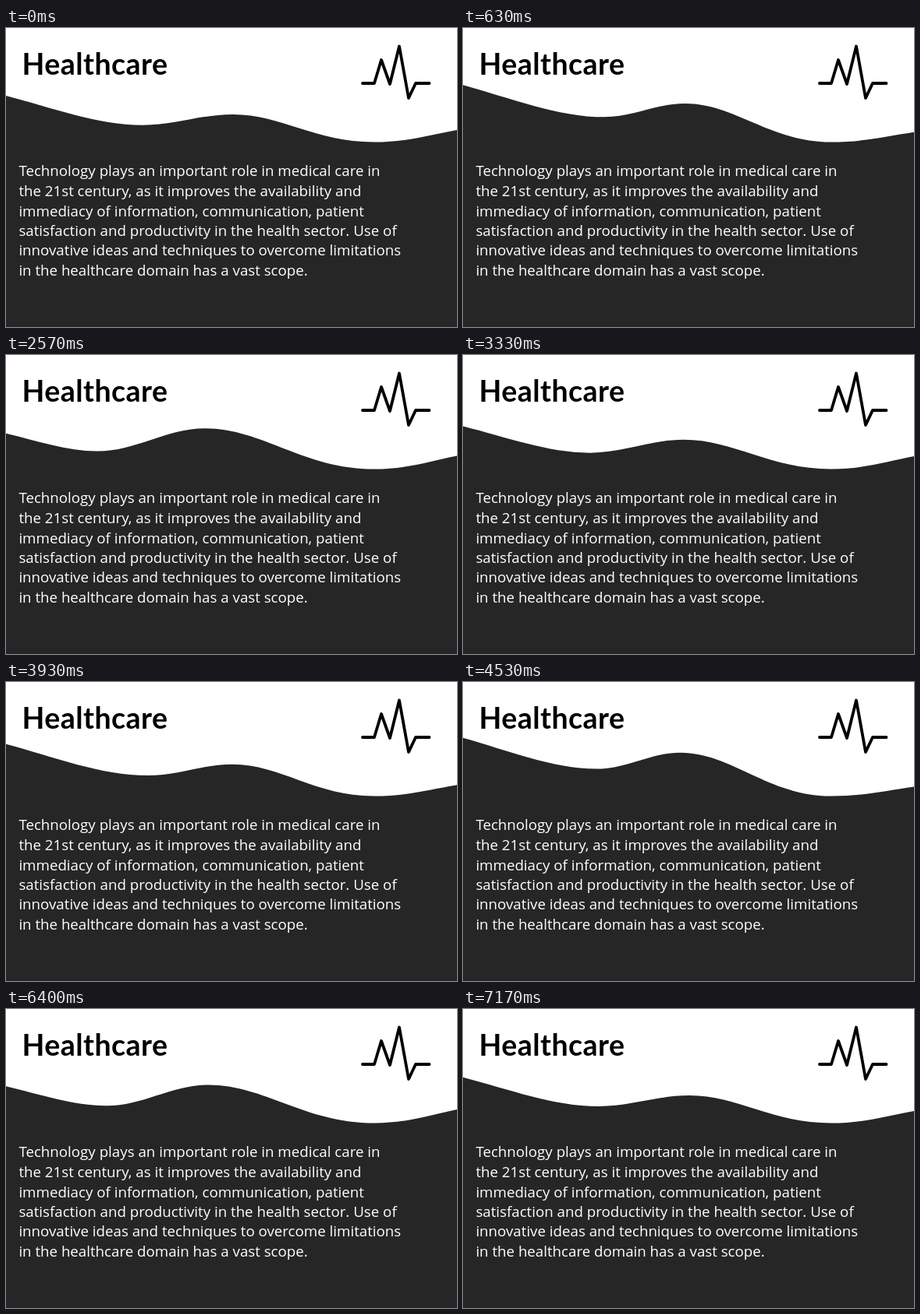
Animation, 578 px wide and 384 px high, one loop 7210 ms. Source, as an HTML page:

```html
<!DOCTYPE html>
<html lang="en">
<head>
<meta charset="utf-8">
<title>Healthcare</title>
<style>
  html, body { margin: 0; width: 100%; height: 100%; overflow: hidden; background: #fff; }
  svg { display: block; width: 578px; height: 384px; }
  .title { font: 700 37.5px Lato, sans-serif; letter-spacing: .45px; }
  .body { font: 18.72px "Open Sans", sans-serif; fill: #fff; }
</style>
</head>
<body>
<svg viewBox="0 0 578 384">
  <path id="wave" fill="#262626"/>
  <text class="title" x="20.5" y="60">Healthcare</text>
  <path d="M457 71H472L481 41L492 72L504 23.5L516 90L525 71H542.5" fill="none" stroke="#000"
    stroke-width="3.8" stroke-linecap="round" stroke-linejoin="round"/>
  <g class="body">
    <text x="16.4" y="190">Technology plays an important role in medical care in</text>
    <text x="16.4" y="216">the 21st century, as it improves the availability and</text>
    <text x="16.4" y="242">immediacy of information, communication, patient</text>
    <text x="16.4" y="267">satisfaction and productivity in the health sector. Use of</text>
    <text x="16.4" y="292">innovative ideas and techniques to overcome limitations</text>
    <text x="16.4" y="318">in the healthcare domain has a vast scope.</text>
  </g>
</svg>
<script>
const W = 578, H = 384, PERIOD = 3605;

// Smooth cyclic curve through four values, one per quarter of the period.
function cycle(phase, ...v) {
  const q = phase * 4, i = Math.floor(q), u = q - i;
  const [a, b, c, d] = [3, 0, 1, 2].map(k => v[(i + k) % 4]);
  return b + u / 2 * (c - a + u * (2 * a - 5 * b + 4 * c - d + u * (3 * (b - c) + d - a)));
}

// Left edge, trough, crest, trough and right edge, joined by curves that lie flat at the turns.
function wavePath(p) {
  const left = cycle(p, 87, 71.5, 98, 100);
  const right = cycle(p, 131, 134.5, 134, 129);
  const dipX = cycle(p, 175, 173, 89, 124), dipY = cycle(p, 124.7, 111.5, 119, 124);
  const topX = cycle(p, 291, 279, 258, 257), topY = cycle(p, 111, 91, 86.5, 96);
  const lowX = 472, lowY = 146.5;
  const mix = (a, b, k) => a + (b - a) * k;

  return `M0 ${H}V${left}
    C${dipX / 3} ${mix(left, dipY, .4)} ${dipX * 2 / 3} ${dipY} ${dipX} ${dipY}
    C${mix(dipX, topX, .36)} ${dipY} ${mix(dipX, topX, .64)} ${topY} ${topX} ${topY}
    C${mix(topX, lowX, .34)} ${topY} ${mix(topX, lowX, .58)} ${lowY} ${lowX} ${lowY}
    C${mix(lowX, W, .4)} ${lowY} ${mix(lowX, W, .67)} ${mix(right, lowY, .4)} ${W} ${right}
    V${H}Z`;
}

const wave = document.getElementById("wave");
function draw() {
  wave.setAttribute("d", wavePath(performance.now() % PERIOD / PERIOD));
  requestAnimationFrame(draw);
}
draw();
</script>
</body>
</html>
```
